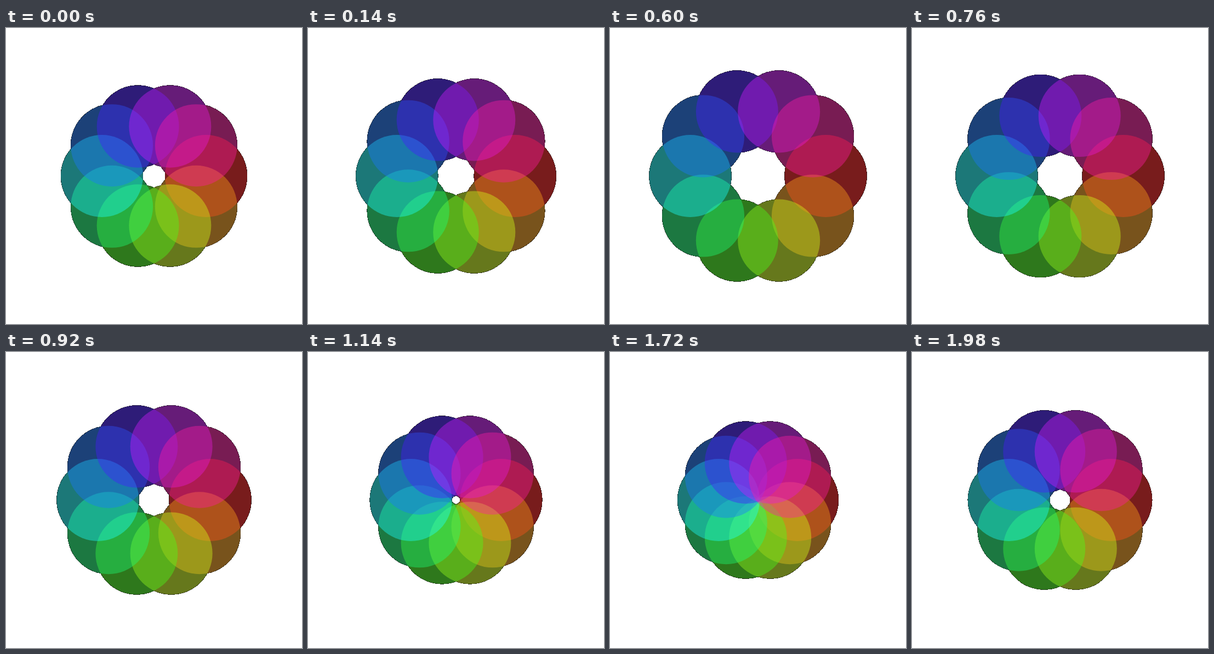
An HTML page with a canvas that plays this animation: 540 by 540 pixels, repeating every 2000 ms.

```html
<!DOCTYPE html>
<html lang="en">
<head>
<meta charset="utf-8">
<title>Breathing colour ring</title>
<style>
  html, body { margin: 0; width: 100%; height: 100%; overflow: hidden; background: #fff; }
  canvas { display: block; }
</style>
</head>
<body>
<canvas width="540" height="540"></canvas>
<script>
const SIZE = 540, MID = SIZE / 2, LOOP = 2000, STEP = 20;
const COUNT = 10, RADIUS = 75, BACKDROP = 30;
const ctx = document.querySelector('canvas').getContext('2d', { willReadFrequently: true });

// Only the blended discs stay visible; the dark backdrop turns white.
function clearBackdrop() {
  const image = ctx.getImageData(0, 0, SIZE, SIZE), px = image.data;
  for (let i = 0; i < px.length; i += 4) {
    if (Math.max(px[i], px[i + 1], px[i + 2]) < BACKDROP + 4) px.fill(255, i, i + 3);
  }
  ctx.putImageData(image, 0, 0);
}

function draw(time) {
  const t = Math.floor(time % LOOP / STEP) * STEP;
  const orbit = 95 + 30 * Math.sin(2 * Math.PI * t / LOOP);
  ctx.fillStyle = `rgb(${BACKDROP}, ${BACKDROP}, ${BACKDROP})`;
  ctx.fillRect(0, 0, SIZE, SIZE);
  for (let i = 0; i < COUNT; i++) {
    const angle = 2 * Math.PI * i / COUNT;
    ctx.fillStyle = `hsla(${360 * i / COUNT}, 100%, 55%, 0.4)`;
    ctx.beginPath();
    ctx.arc(MID + orbit * Math.cos(angle), MID + orbit * Math.sin(angle), RADIUS, 0, 2 * Math.PI);
    ctx.fill();
  }
  clearBackdrop();
}

function tick() {
  draw(performance.now());
  requestAnimationFrame(tick);
}
tick();
</script>
</body>
</html>
```
